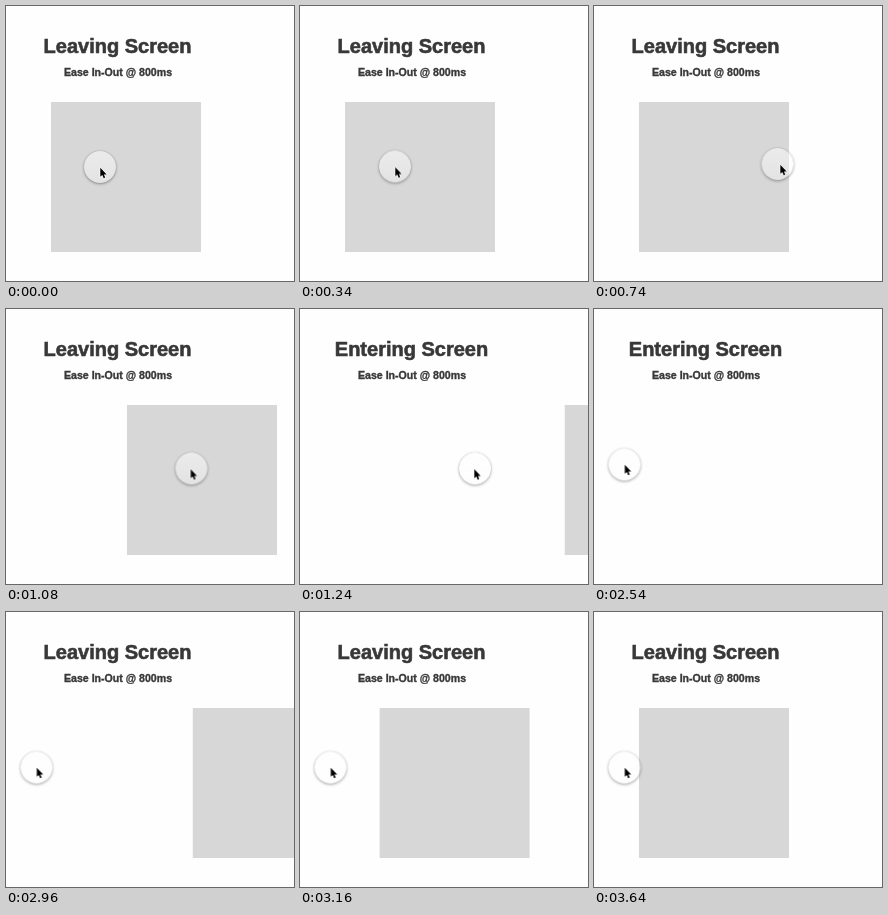
Write an HTML page that moves like this. It is 288x275 px and loops after 3940 ms.

```html
<!DOCTYPE html>
<html lang="en">
<head>
<meta charset="utf-8">
<title>Leaving and entering screen</title>
<style>
  html, body { margin: 0; width: 100%; height: 100%; overflow: hidden; background: #fefefe; }
  .stage { position: relative; width: 288px; height: 275px; overflow: hidden; }
  .stage > * { position: absolute; left: 0; top: 0; }

  .panel, .knob, .pointer { animation: 3940ms linear infinite; }
  .leaving, .entering { animation: 3940ms step-end infinite; }

  svg { overflow: visible; }
  text {
    font-family: "Liberation Sans", Arial, sans-serif;
    font-weight: bold;
    text-anchor: middle;
    fill: #383838;
    stroke: #383838;
  }
  .title { font-size: 20px; stroke-width: .6px; }
  .note { font-size: 10.6px; stroke-width: .35px; }
  .leaving { animation-name: leaving; }
  .entering { animation-name: entering; }

  .panel {
    left: 44.8px; top: 95.8px;
    width: 150.6px; height: 150.6px;
    background: #d7d7d7;
    animation-name: panel;
  }
  .knob {
    left: -16px; top: -16px;
    width: 32px; height: 32px;
    border-radius: 50%;
    background: linear-gradient(rgba(255, 255, 255, .51), rgba(255, 255, 255, .31));
    box-shadow: 0 0 1px rgba(0, 0, 0, .35), 0 1px 3px rgba(0, 0, 0, .34);
    animation-name: knob;
  }
  .pointer { animation-name: pointer; }

  @keyframes leaving {
    0% { visibility: visible; }
    27.92% { visibility: hidden; }
    73.6%, 100% { visibility: visible; }
  }
  @keyframes entering {
    0% { visibility: hidden; }
    27.92% { visibility: visible; }
    73.6%, 100% { visibility: hidden; }
  }

  /* slides out with a short hitch, then returns on one smooth curve */
  @keyframes panel {
    0% { transform: translateX(0); }
    21.8% { transform: translateX(0); animation-timing-function: cubic-bezier(.51, 0, .77, .43); }
    26.9%, 27.5% { transform: translateX(76px); }
    31.47% { transform: translateX(219px); animation-timing-function: cubic-bezier(.15, .54, .4, 1); }
    42.1% { transform: translateX(300px); }
    67.82% { transform: translateX(300px); animation-timing-function: cubic-bezier(.4, 0, .2, 1); }
    88.12%, 100% { transform: translateX(0); }
  }

  @keyframes knob {
    0% { transform: translate(94px, 161px); }
    8.63% { transform: translate(95px, 160.5px); }
    12.7% { transform: translate(95px, 160.5px); animation-timing-function: cubic-bezier(.4, 0, .6, 1); }
    18.78% { transform: translate(183.5px, 158px); animation-timing-function: ease-out; }
    21.83% { transform: translate(187px, 158.5px); }
    27.41% { transform: translate(185.5px, 159.5px); }
    31.47% { transform: translate(175px, 159.5px); animation-timing-function: ease-in-out; }
    40.1% { transform: translate(182px, 158px); }
    54.57% { transform: translate(182px, 158px); animation-timing-function: ease-in-out; }
    64.47%, 100% { transform: translate(30.5px, 155.5px); }
  }

  @keyframes pointer {
    0% { transform: translate(94px, 161px); }
    8.63% { transform: translate(95px, 160.5px); }
    12.7% { transform: translate(95px, 160.5px); animation-timing-function: cubic-bezier(.4, 0, .6, 1); }
    18.78% { transform: translate(186px, 158px); animation-timing-function: ease-out; }
    21.83% { transform: translate(187px, 158.5px); }
    27.41% { transform: translate(184.5px, 159.5px); }
    31.47% { transform: translate(174px, 159.5px); animation-timing-function: ease-in-out; }
    41.6% { transform: translate(181.5px, 158px); }
    54.57% { transform: translate(181.5px, 158px); animation-timing-function: ease-in-out; }
    64.47%, 100% { transform: translate(30.5px, 155px); }
  }
</style>
</head>
<body>
<div class="stage">
  <svg width="288" height="96">
    <text class="title leaving" x="111.5" y="47.3">Leaving Screen</text>
    <text class="title entering" x="111.5" y="47.3">Entering Screen</text>
    <text class="note" x="112" y="69.9">Ease In-Out @ 800ms</text>
  </svg>
  <div class="panel"></div>
  <div class="knob"></div>
  <svg class="pointer" width="10" height="14">
    <path d="M.3 .8V9.8L2.3 7.9L3.7 11.2L5.2 10.5L3.9 7.4H6.7Z"
          fill="#000" stroke="#fff" stroke-width="1.2" paint-order="stroke" stroke-linejoin="round"/>
  </svg>
</div>
</body>
</html>
```
